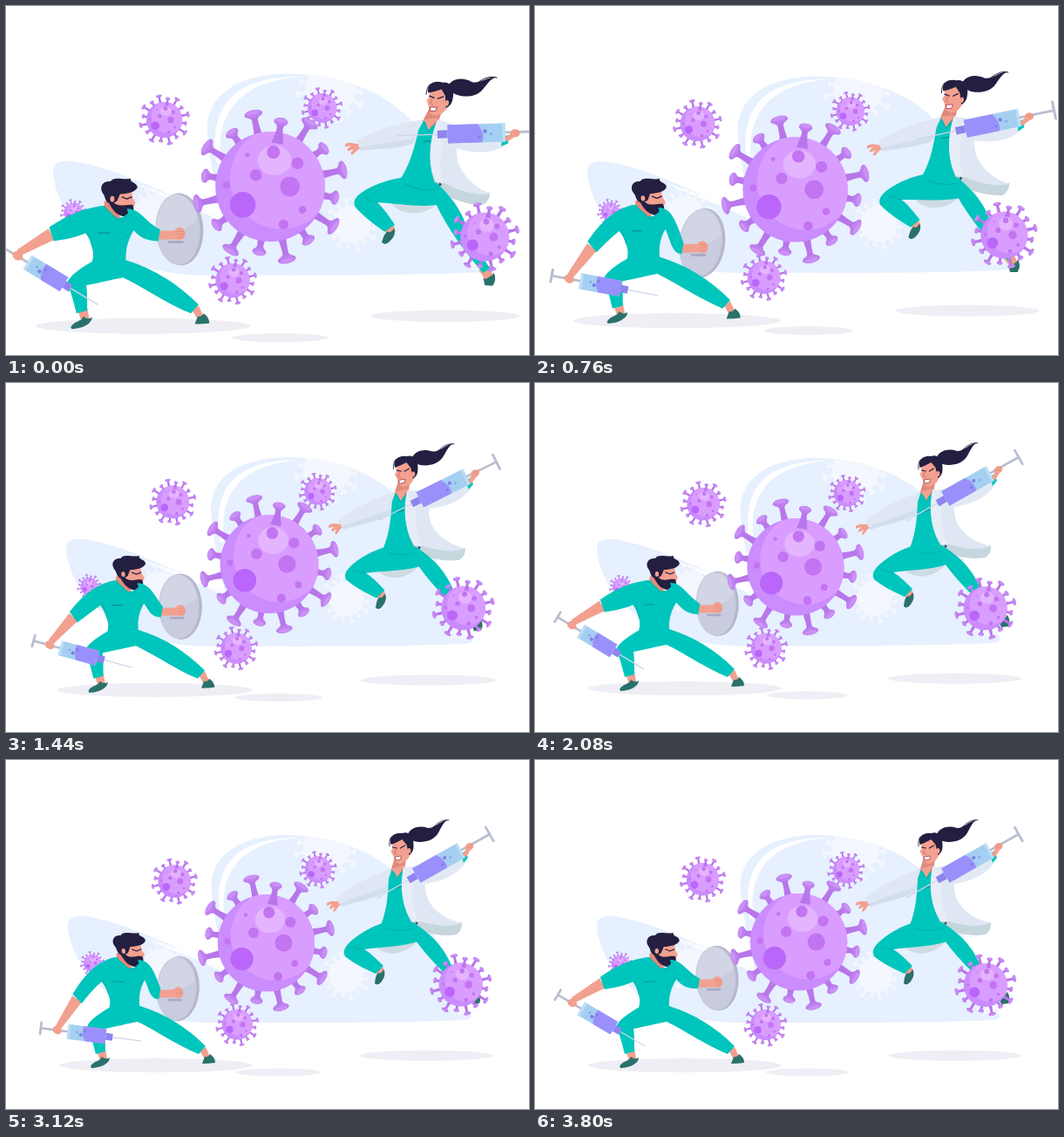
Animation, 600 px wide and 400 px high, one loop 3840 ms. Source, as an HTML page with a canvas:

```html
<!DOCTYPE html>
<html lang="en">
<head>
<meta charset="utf-8">
<style>
html, body { margin: 0; width: 100%; height: 100%; overflow: hidden; background: #fff; }
canvas { display: block; width: 600px; height: 400px; }
</style>
</head>
<body>
<canvas id="stage" width="600" height="400"></canvas>
<script>
const ctx = document.getElementById('stage').getContext('2d');
const LOOP = 3840, STEP = 40, ZOOM_TIME = 1840, TAU = Math.PI * 2;
const TEAL = '#00c5bc', TEAL_DARK = '#00aea6', SKIN = '#f2a08f', SKIN_DARK = '#e08a7c';
const HAIR = '#231f41', SHOE = '#2a716b', METAL = '#b9bdd0', COAT = '#dee7f3';

const mix = (a, b, k) => a + (b - a) * k;

function fill(color, d) {
  ctx.fillStyle = color;
  ctx.fill(new Path2D(d));
}

function line(color, width, d) {
  ctx.strokeStyle = color;
  ctx.lineWidth = width;
  ctx.lineCap = ctx.lineJoin = 'round';
  ctx.stroke(new Path2D(d));
}

function oval(color, x, y, rx, ry = rx, angle = 0) {
  ctx.fillStyle = color;
  ctx.beginPath();
  ctx.ellipse(x, y, rx, ry, angle, 0, TAU);
  ctx.fill();
}

// Limb narrowing from width w1 at a to w2 at b.
function limb(color, a, b, w1, w2) {
  const d = Math.hypot(b.x - a.x, b.y - a.y) * 2;
  const nx = (a.y - b.y) / d, ny = (b.x - a.x) / d;
  fill(color, `M${a.x + nx * w1} ${a.y + ny * w1}L${b.x + nx * w2} ${b.y + ny * w2}
    L${b.x - nx * w2} ${b.y - ny * w2}L${a.x - nx * w1} ${a.y - ny * w1}Z`);
}

function group(draw) {
  ctx.save();
  draw();
  ctx.restore();
}

function rotateAt(x, y, angle) {
  ctx.translate(x, y);
  ctx.rotate(angle);
  ctx.translate(-x, -y);
}

// Each depth layer is enlarged around the stage centre by its own amount.
function layer(amount, draw) {
  group(() => {
    ctx.translate(300, 200);
    ctx.scale(1 + amount, 1 + amount);
    ctx.translate(-300, -200);
    draw();
  });
}

function spike(i, ghost) {
  const long = i % 2 === 0, len = long ? 1.36 : 1.2, w = long ? 0.17 : 0.13;
  group(() => {
    ctx.rotate((-103 + 22.5 * i) * Math.PI / 180);
    fill(ghost || '#b876ea', `M.8-.11 Q1.05-.05 ${len - 0.1}-.055 L${len - 0.02}-${w * 0.8}
      L${len - 0.02} ${w * 0.8} L${len - 0.1} .055 Q1.05 .05 .8 .11Z`);
    oval(ghost || '#bf80ef', len, 0, 0.075, w);
    if (!ghost) oval('#cb91f6', len + 0.025, 0, 0.04, w * 0.75);
  });
}

// x, y, radius in units of the virus body
const SPOTS = [[-.5, .33, .235], [.36, 0, .18], [-.26, -.21, .11], [.5, -.43, .11], [.06, -.63, .12],
  [.245, .69, .09], [.59, .42, .07], [-.8, -.03, .065], [-.42, -.58, .04]];

function virus(x, y, r, ghost) {
  group(() => {
    ctx.translate(x, y);
    ctx.scale(r, r);
    for (let i = 0; i < 16; i++) if (ghost || i !== 1) spike(i, ghost);
    oval(ghost || '#cb8cfd', 0, 0, 1);
    if (ghost) return;
    group(() => {
      ctx.beginPath();
      ctx.arc(0, 0, 1, 0, TAU);
      ctx.clip();
      oval('#d99dff', 0.2, -0.16, 0.93);
    });
    oval('#e4b5fe', 0.08, -0.48, 0.31, 0.27);
    SPOTS.forEach(([sx, sy, sr], i) => oval(i ? '#c374f1' : '#bb66fa', sx, sy, sr));
    spike(1);
  });
}

function syringe(half, h, nozzle, needle, handle, grip) {
  const t = h / 2;
  line('#ccd5ea', 1.2, `M${nozzle} 0H${needle}`);
  line(METAL, 2.6, `M${-half} 0H${-handle}`);
  line(METAL, 2.8, `M${-handle} ${-grip}V${grip}`);
  fill('#8f84ee', `M${half} -4H${nozzle}V4H${half}Z`);
  fill('#a4cff1', `M${-half} ${-t}H${half}V${t}H${-half}Z`);
  fill('#9a90fb', `M${half} ${-t}V${t}H${-half * 0.05}Q${-half * 0.3} 0 ${-half * 0.2} ${-t}Z`);
  fill('#bcdff6', `M${-half} ${-t}h3V${t}h-3Z`);
  oval('#7f7ee8', -half * 0.3, t * 0.2, 2);
  oval('#7f7ee8', -half * 0.1, -t * 0.4, 1.5);
  oval('#8aa5ee', -half * 0.5, -t * 0.1, 1.4);
}

const BLOB = new Path2D(`M71 192C70 176 86 177 110 183C150 192 205 220 252 241
  C246 210 238 180 236 152C232 108 270 86 324 86C382 87 432 108 458 142
  C486 180 505 235 522 276C535 291 538 297 525 298C440 302 320 301 232 301
  C134 300 77 246 71 192Z`);

function backdrop() {
  const white = '#f4f7fd';
  ctx.fillStyle = '#e6f0fe';
  ctx.fill(BLOB);
  fill('#fff', 'M158 203C192 213 226 227 256 245C222 229 190 218 158 203Z');
  line('#fff', 2, 'M180 213Q218 226 254 244');
  fill('#fff', 'M246 182C236 118 266 89 337 89C284 93 242 116 251 182Z');
  ctx.clip(BLOB);
  virus(368, 100, 27, white);
  virus(390, 247, 20, white);
  virus(178, 236, 20, white);
  virus(521, 283, 9, white);
}

function manHead() {
  fill(SKIN_DARK, 'M132 221L143 224L148 238L141 240L131 229Z');
  fill(SKIN, 'M140 210L160 211L161 218L164 223L161 229L142 229Z');
  fill(HAIR, `M140 221C146 229 152 224 161 225C164 232 160 237 152 237C144 236 140 230 136 222Z`);
  fill(HAIR, `M136 223C132 221 133 216 130 213C126 206 131 200 138 201C142 195 151 200 159 198
    C158 203 165 201 166 207C164 212 155 214 148 214L145 221L140 224Z`);
  oval(SKIN, 140, 219, 2.2, 3);
  line(HAIR, 1.3, 'M150 217L155 219L160 217');
}

function man(w) {
  const c = Math.cos(w), s = Math.sin(w), v = (1 - c) / 2;
  const lean = -7 * v, dx = lean * 0.55;
  const shield = { x: 202 + 6.5 * c, y: 258.5 - 7 * c + 5 * s };
  const cuff = { x: shield.x - 20, y: shield.y + 6 };
  const elbow = { x: mix(77, 82, v), y: mix(255, 275, v) };
  const hand = { x: mix(41, 59, v), y: mix(277, 312, v) };

  group(() => {
    ctx.translate(shield.x, shield.y);
    ctx.rotate((2 - 4 * c + 4 * s) * Math.PI / 180);
    oval('#b7b6ce', 1.5, 0, 24, 37.3);
    oval('#c9cbde', -0.8, 0, 23, 36.6);
    fill('#d1d5e4', 'M-22 4C-24-18-12-36 0-36C12-33 18-22 20-10C8 2-8 6-22 4Z');
  });

  fill(SKIN, 'M104 333L114 331L116 342L108 345Z');
  fill(SKIN, 'M222 333L229 329L234 340L228 343Z');
  fill(SHOE, 'M97 351C101 344 108 346 110 340Q115 344 119 341C119 348 108 353 98 353Z');
  fill(SHOE, 'M225 348L228 340Q232 341 234 337Q240 341 240 347Q234 348 225 348Z');
  fill(TEAL, `M118 284C106 291 95 299 93 306C98 316 100 326 103 337L114 334
    C114 323 114 314 113 308C128 305 140 302 151 300C174 311 196 327 221 337L229 328
    C207 306 183 291 154 282Z`);
  line(TEAL_DARK, 0.8, 'M126 290Q139 291 150 285');

  // The body leans from the hips, so the feet stay in place.
  group(() => {
    ctx.transform(1, 0, -lean / 90, 1, lean * 290 / 90, 0);
    fill(TEAL, `M131 226C119 227 108 236 108 250C115 255 118 264 120 273Q121 281 117 288
      Q135 295 154 286C154 276 153 266 163 250C167 240 165 231 158 230L152 238L142 238Z`);
    manHead();
    fill(TEAL, 'M131 226L147 241L157 233L160 244L140 252L122 240Z');
    line(TEAL_DARK, 0.9, 'M132 227Q141 239 150 242L155 236');
    line('#0a8f8b', 1.2, 'M126 254H137');
    line(TEAL_DARK, 0.8, 'M162 250Q156 257 150 261M113 252Q118 258 119 268');
  });

  line(SKIN, 9, `M${cuff.x} ${cuff.y}L${shield.x} ${shield.y + 5.5}`);
  line('#a9a8c4', 2.5, `M${shield.x - 10} ${shield.y + 13}H${shield.x + 4}`);
  oval(SKIN, shield.x + 1, shield.y + 4.5, 6, 6.5);
  line(SKIN_DARK, 0.7, `M${shield.x - 1} ${shield.y + 2}h6m-6 3h7m-6 3h5`);
  fill(TEAL, `M${155 + dx} 229C${169 + dx} 229 ${174 + dx} 243 ${cuff.x + 1} ${cuff.y - 6}
    L${cuff.x - 1} ${cuff.y + 6}C${cuff.x - 13} ${cuff.y + 6} ${168 + dx} 259 ${161 + dx} 250Z`);

  group(() => {
    ctx.translate(hand.x, hand.y);
    ctx.rotate((18.5 + 13 * c) * Math.PI / 180);
    ctx.translate(35, 0);
    syringe(22, 17, 30, 62, 53, 6.5);
  });
  limb(SKIN, elbow, { x: hand.x + 2, y: hand.y - 3 }, 13, 7);
  oval(SKIN, hand.x + 1, hand.y, 5.5, 4.5, 0.5);

  const sx = 118 + dx, d = Math.hypot(elbow.x - sx, elbow.y - 242);
  const nx = -(elbow.y - 242) / d * 7.5, ny = (elbow.x - sx) / d * 7.5;
  fill(TEAL, `M${132 + dx} 226Q${104 + dx} 228 ${elbow.x + nx} ${elbow.y + ny}
    L${elbow.x - nx} ${elbow.y - ny}Q${106 + dx} 259 ${116 + dx} 252Z`);
}

function womanHead() {
  fill(SKIN_DARK, 'M447 108L460 108L457 126L449 132L442 125Z');
  group(() => {
    ctx.translate(1.5, 0);
    fill(SKIN, 'M441 91L462 90L462 109Q458 118 450 119Q444 118 443 110L440 105L442 101Z');
    fill(HAIR, `M440 97C437 88 444 83 453 84C461 81 467 89 466 99C466 104 464 107 461 109
      L458 97L453 91Q446 95 440 97Z`);
    line(HAIR, 1.2, 'M442 100L447 101M451 101L456 98');
    line('#c46d66', 0.8, 'M446 101L444 107L447 108');
    fill('#fff', 'M445 111L452 110L451 114L446 115Z');
    line('#a9424e', 0.8, 'M445 111L452 110L451 114L446 115Z');
    oval(SKIN, 461, 104, 2, 3);
  });
  fill(HAIR, `M460 89C461 79 472 74 484 78C493 78 497 70 508 68C501 71 499 79 495 85
    C488 95 470 97 460 89Z`);
  line(HAIR, 0.8, 'M490 77Q500 67 508 69M442 88Q439 92 440 99');
}

function woman(q) {
  rotateAt(382, 227, 0.185 * q);

  // Coat lining and tail
  fill('#c6d6dd', 'M460 160C475 182 500 190 523 186Q524 195 517 200C497 203 478 198 462 190Z');
  fill('#cfdbe3', 'M424 214C436 226 458 224 472 207L455 200Z');
  fill(COAT, 'M454 124C468 121 480 128 481 140C479 162 494 180 523 187C503 194 482 187 464 182Z');

  // Back leg
  fill(SHOE, 'M532 273L542 266Q546 272 543 279L535 280Z');
  fill(SKIN, 'M526 266L536 259L541 268L534 274Z');
  fill(TEAL, 'M446 187L467 186C485 198 500 210 511 235L537 262L531 268C508 250 487 230 470 207Z');

  // Front leg
  fill(SKIN, 'M424 243L432 237L435 243L428 249Z');
  fill(SHOE, 'M423 256C424 250 424 247 427 244Q430 246 433 240C436 245 434 250 430 255Q426 259 423 256Z');
  fill(TEAL, `M433 187C418 191 398 203 390 214Q386 220 389 225C400 234 413 240 424 245L433 236
    C425 228 418 221 411 217C430 214 456 214 472 208L467 187Z`);
  line(TEAL_DARK, 0.9, 'M411 217Q402 216 397 214M436 193Q451 198 466 193');

  // Front arm and torso
  fill(SKIN, `M385 162L378 162Q372 161 368 164L368 167L374 165L371 169L372 171L377 168
    L375 173L377 174L382 167L386 166Z`);
  fill(COAT, `M443 125C424 130 399 142 379 158Q382 165 385 168C402 162 420 160 436 151
    Q441 138 447 128Z`);
  fill('#d3deed', 'M385 168C402 162 420 160 436 151L438 144C420 153 400 157 383 165Z');
  fill(TEAL, 'M442 127L457 124C453 142 452 165 467 189Q452 197 430 189C437 172 438 156 439 136Z');
  womanHead();
  fill(SKIN, 'M443 124L456 121L449 135Z');
  line(TEAL_DARK, 0.9, 'M442 126L449 136L457 124');
  line('#0a8f8b', 1, 'M446 147L453 145');
  fill('#e7edf6', 'M456 122L466 124C468 145 462 162 474 185L466 185C453 165 452 143 456 122Z');
  oval('#3c5269', 471, 187, 1.5);

  group(() => {
    rotateAt(462, 128, 0.3 * q);
    fill('#e1e9f4', 'M456 124C472 119 500 121 521 105L528 115C522 130 498 142 470 143Z');
    fill(TEAL, 'M522 108L527 104L530 112L525 118Z');
    group(() => {
      ctx.translate(496.5, 118);
      ctx.rotate(Math.PI - 0.515);
      syringe(29.5, 19, 40, 81, 67, 9);
    });
    line(SKIN, 5, 'M527 108L532 100');
    oval(SKIN, 531.5, 99.5, 5, 4, -0.5);
    line(SKIN_DARK, 0.7, 'M530 96L535 97M529 99L534 100');
  });
}

function draw(t) {
  const q = (1 + Math.cos(Math.PI * Math.min(t / ZOOM_TIME, 1))) / 2;
  const a = TAU * t / 1280, ca = Math.cos(a), sa = Math.sin(a);
  const drift = Math.cos(TAU * (t - 1240) / 1760);
  ctx.fillStyle = '#fff';
  ctx.fillRect(0, 0, 600, 400);

  layer(0.075 * q, backdrop);
  layer(0.112 * q, () => oval('#eeeef4', 172, 350, 111, 8));
  layer(0.14 * q, () => oval('#eeeef4', 312.6, 358, 48 + 2 * sa, 4.5));
  layer(0.12 * q, () => oval('#eeeef4', 482, 338.7, 76.5, 6));
  layer(0.1 * q, () => {
    virus(98.3 - 0.8 * ca, 233.3 - 0.7 * sa, 9.8);
    virus(192.8 - 0.4 * ca, 138 - 1.2 * ca, 18.7);
    virus(357.5 - 0.6 * ca, 126 - 0.8 * sa - 1.5 * q, 15.2);
  });
  layer(0.112 * q, () => man(TAU * (t - 80) / 1920));
  layer(0.13 * q, () => virus(300.5 + 2.2 * ca, 209.3 - ca - 1.2 * sa - 2 * q, 55.6));
  layer(0.12 * q, () => virus(264.8 - 0.5 * ca, 303.5 - 0.9 * sa - 1.2 * q, 17.5));
  layer(0.12 * q, () => woman(q));
  layer(0.12 * q, () => virus(519.3 + 2.6 * drift + 4 * q, 257.8 - 0.8 * sa, 25));
}

const start = performance.now();
function frame() {
  const t = (performance.now() - start) % LOOP;
  draw(Math.floor(t / STEP) * STEP);
  requestAnimationFrame(frame);
}
frame();
</script>
</body>
</html>
```
